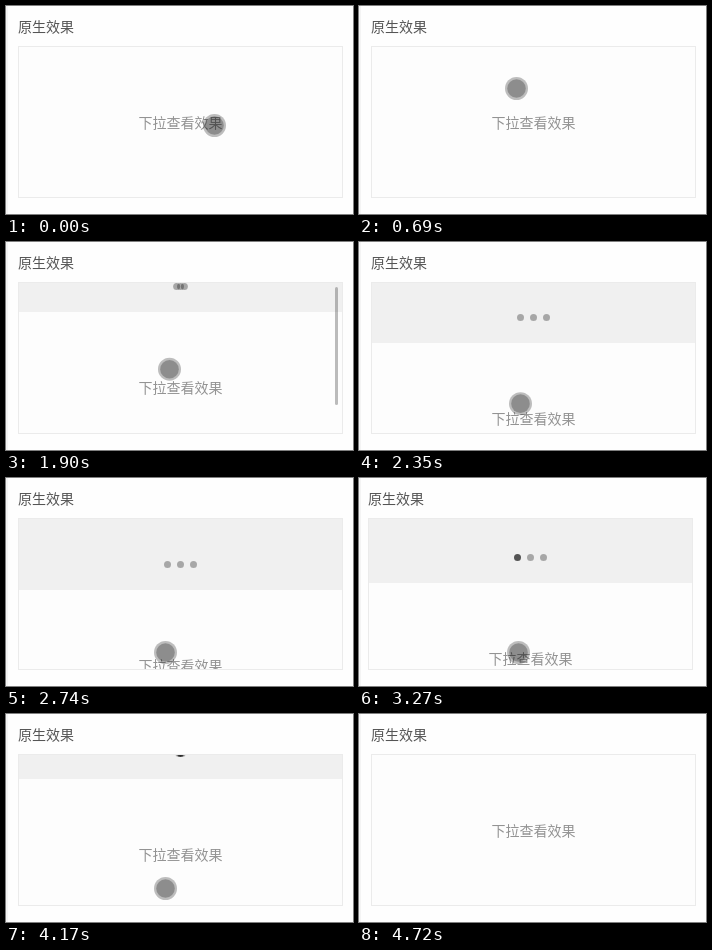
An HTML page for the animation above (5.37 s loop, 347 by 208 pixels).

```html
<!DOCTYPE html>
<html lang="zh-CN">
<head>
<meta charset="utf-8">
<style>
  html, body { margin: 0; width: 100%; height: 100%; overflow: hidden; background: #fefefe; }
  svg { display: block; }
  text { font: 14px "Noto Sans CJK SC", "Noto Sans CJK", sans-serif; }
</style>
</head>
<body>
<svg width="347" height="208">
  <rect width="2" height="208" fill="#f4f4f4"/>
  <g id="page">
    <text x="12" y="26" fill="#555">原生效果</text>
    <rect x="12.5" y="40.5" width="324" height="151" fill="#fdfdfd" stroke="#ebebeb"/>
    <svg x="13" y="41" width="323" height="150" overflow="hidden">
      <rect id="header" width="323" fill="#f0f0f0"/>
      <g id="dots">
        <circle r="3.5"/><circle r="3.5"/><circle r="3.5"/>
      </g>
      <text id="hint" x="161.5" text-anchor="middle" fill="#939393">下拉查看效果</text>
      <rect id="scrollbar" x="316" y="4" width="3" rx="1.5" fill-opacity=".26"/>
    </svg>
  </g>
  <g id="cursor" fill-opacity=".25">
    <circle r="11.5"/><circle r="9.3"/>
  </g>
</svg>
<script>
const LOOP = 5370;
const STEP = 135;          // the picture is refreshed at this interval
const STEP_LEAD = 15;
const DRAG_START = 1485;
const RELEASE = 3240;
const MAX_PULL = 71;
const REST_PULL = 56;      // header height while refreshing

const el = id => document.getElementById(id);
const set = (node, attrs) => {
  for (const name in attrs) node.setAttribute(name, attrs[name]);
};
const clamp = (v, lo, hi) => Math.min(hi, Math.max(lo, v));
const progress = (t, from, to) => clamp((t - from) / (to - from), 0, 1);
const easeOut = p => Math.sin(p * Math.PI / 2);
const easeInOut = p => p * p * (3 - 2 * p);
const show = visible => visible ? 'visible' : 'hidden';

const dragAmount = t => easeOut(progress(t, 1593, 2700));

function pullAt(t) {
  const settle = easeOut(progress(t, 3105, 3510));
  const close = easeInOut(progress(t, 4023, 4320));
  return Math.round(MAX_PULL * dragAmount(t) - (MAX_PULL - REST_PULL) * settle - REST_PULL * close);
}

function cursorAt(t) {
  if (t >= DRAG_START) {
    return [163.5 - 4 * easeInOut(progress(t, 1890, 2700)), 94.5 + 80 * dragAmount(t)];
  }
  const approach = easeInOut(progress(t, 0, 675));
  const drift = 2 * progress(t, 675, 945);
  return [208.5 - 51 * approach + drift, 119.5 - 37 * approach + drift];
}

function drawContent(t) {
  const pull = pullAt(t);
  set(el('header'), { height: pull });
  set(el('hint'), { y: 81 + pull });
  set(el('scrollbar'), {
    height: 147 - pull,
    visibility: show(t < RELEASE && pull > 10 && pull < 50)
  });

  const spread = clamp((pull - 20) * 0.43, 0, 13);
  const active = t >= RELEASE ? Math.floor((t - RELEASE) / 520) % 3 : -1;
  [...el('dots').children].forEach((dot, i) => set(dot, {
    cx: 161.5 + (i - 1) * spread,
    cy: pull - 25.5,
    'fill-opacity': i === active ? 0.65 : 0.3
  }));
}

function drawCursor(t) {
  const [x, y] = cursorAt(t);
  set(el('cursor'), {
    transform: `translate(${x} ${y})`,
    visibility: show(t < 1350 || (t >= DRAG_START && t < 4725))
  });
}

function draw(time) {
  const t = Math.floor((time % LOOP + STEP_LEAD) / STEP) * STEP;
  drawContent(t);
  drawCursor(t);
  // The refresh jolts the page to the left.
  const jolt = t >= RELEASE ? 3 * (1 - progress(t, RELEASE, RELEASE + 2 * STEP)) : 0;
  set(el('page'), { transform: `translate(${-jolt} 0)` });
}

const start = performance.now();
function tick() {
  draw(performance.now() - start);
  requestAnimationFrame(tick);
}
tick();
</script>
</body>
</html>
```
